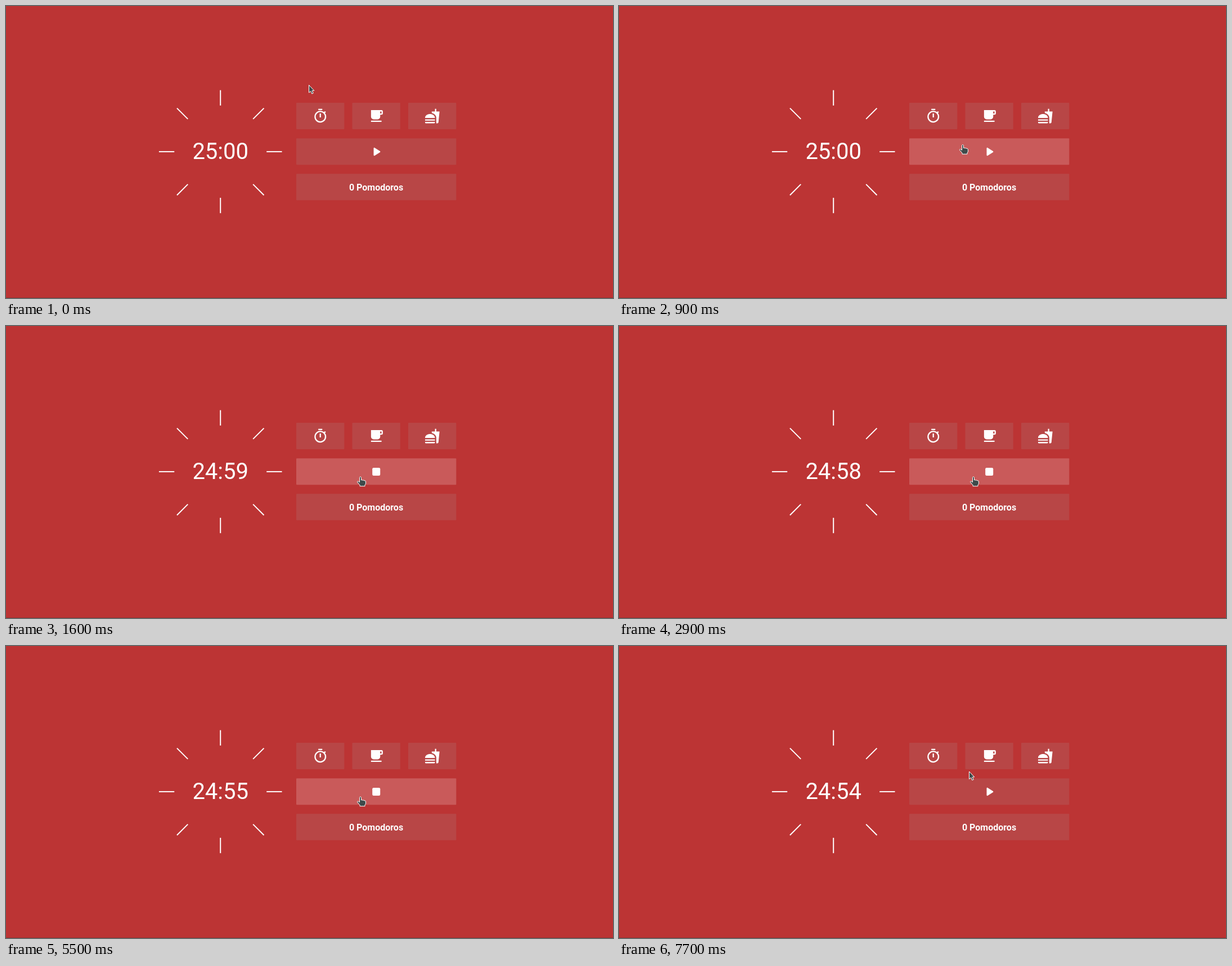
Animation, 1079 px wide and 519 px high, one loop 8 s. Source, as an HTML page:

```html
<!DOCTYPE html>
<html lang="en">
<meta charset="utf-8">
<title>Pomodoro timer</title>
<style>
  html, body { margin: 0; height: 100%; overflow: hidden; background: #bc3434; }
  svg { display: block; }
  text { font-family: Roboto, sans-serif; text-anchor: middle; fill: #fff; }
  .button { fill: #b84646; }
  .button.hover { fill: #c95a5a; }
  .icon { fill: #fff; }
  .cursor { fill: #3f4a4a; stroke: #fff; stroke-width: 1; stroke-linejoin: round; }
</style>
<svg width="1079" height="519" viewBox="0 0 1079 519">
  <rect y="518" width="1079" height="1" fill="#963030"/>
  <g id="ticks" stroke="#fff" stroke-width="2"></g>
  <text id="clock" x="381.2" y="272.4" font-size="40">25:00</text>

  <rect class="button" id="work" x="516" y="172" width="85.3" height="47" rx="1"/>
  <rect class="button" x="615.5" y="172" width="85.3" height="47" rx="1"/>
  <rect class="button" x="715" y="172" width="85.3" height="47" rx="1"/>
  <rect class="button" id="toggle" x="516" y="235.3" width="284.3" height="47" rx="1"/>
  <rect class="button" x="516" y="298.3" width="284.3" height="47" rx="1"/>

  <path class="icon" transform="translate(544.7 181.6) scale(1.167)" fill-rule="evenodd" d="M15 1H9v2h6zM11 14h2V8h-2zM19.03 7.39l1.42-1.42c-.43-.51-.9-.99-1.41-1.41l-1.42 1.42A9 9 0 1 0 19.03 7.39zM12 20a7 7 0 1 1 0-14 7 7 0 0 1 0 14z"/>
  <path class="icon" transform="translate(644.2 181.6) scale(1.167)" fill-rule="evenodd" d="M20 3H4v10a4 4 0 0 0 4 4h6a4 4 0 0 0 4-4v-3h2a2 2 0 0 0 2-2V5a2 2 0 0 0-2-2zm0 5h-2V5h2zM4 19h16v2H4z"/>
  <path class="icon" transform="translate(743.8 181.6) scale(1.167)" d="M18.06 23h1.66c.84 0 1.53-.64 1.63-1.46L23 5.05h-5V1h-1.97v4.05h-4.97l.3 2.34c1.71.47 3.31 1.32 4.27 2.26 1.44 1.42 2.43 2.89 2.43 5.29zM1 22v-1h15v1q0 1-1 1H2q-1 0-1-1zM16 15C16 7 1 7 1 15zM1 17h15v2H1z"/>
  <path class="icon" id="play" transform="translate(644.2 245) scale(1.167)" d="M8 6.82v10.36c0 .79.87 1.27 1.54.84l8.14-5.18c.62-.39.62-1.29 0-1.69L9.54 5.98C8.87 5.55 8 6.03 8 6.82z"/>
  <rect class="icon" id="stop" x="651.2" y="252" width="14" height="14" rx="2.3"/>
  <text x="658" y="327.6" font-size="16" font-weight="700">0 Pomodoros</text>

  <path class="cursor" id="arrow" d="M.5.5V14l3.2-2.6 2 4.6 2.5-1-2-4.6h3.6z"/>
  <path class="cursor" id="hand" d="M-1.5 2c0-2 3-2 3 0v4.5l1.2-.5 1.5.8 1.5-.3 1.3.9 1.5 0 .9 1.2v4.4l-1.4 2.2v2H-1v-2l-4.3-4.9c-.7-1.3.6-2.4 1.8-1.6l2 1.5z"/>
</svg>
<script>
  const $ = id => document.getElementById(id);
  const show = (id, on) => $(id).style.display = on ? '' : 'none';

  for (let a = 0; a < 360; a += 45)
    $('ticks').innerHTML += `<path d="M82 0H109.3" transform="translate(381.2 258.9) rotate(${a})"/>`;

  // [start, cursor, x, y, hovered button]
  const moves = [
    [0, 'arrow', 538, 140],
    [300, 'arrow', 535.5, 138],
    [600, 'arrow', 562, 166],
    [700, 'hand', 587, 204, 'work'],
    [800, 'arrow', 600, 226],
    [900, 'hand', 611, 246, 'toggle'],
    [1000, 'hand', 619.5, 259, 'toggle'],
    [1100, 'hand', 627, 265, 'toggle'],
    [1200, 'hand', 630, 267.5, 'toggle'],
    [6600, 'hand', 616, 259, 'toggle'],
    [6900, 'hand', 616.5, 240, 'toggle'],
    [7700, 'arrow', 622, 222.5]
  ];
  const seconds = [1600, 2900, 3400, 4400, 5500, 6600];

  function draw(now) {
    const t = now % 8000;
    const [, cursor, x, y, hover] = moves.findLast(m => m[0] <= t);
    for (const id of ['arrow', 'hand']) {
      show(id, id === cursor);
      $(id).setAttribute('transform', `translate(${x} ${y})`);
    }
    for (const id of ['work', 'toggle']) $(id).classList.toggle('hover', id === hover);

    const passed = seconds.filter(s => s <= t).length;
    $('clock').textContent = passed ? `24:${60 - passed}` : '25:00';
    const running = t >= 1600 && t < 5700;
    show('play', !running);
    show('stop', running);
    requestAnimationFrame(draw);
  }
  draw(performance.now());
</script>
</html>
```
